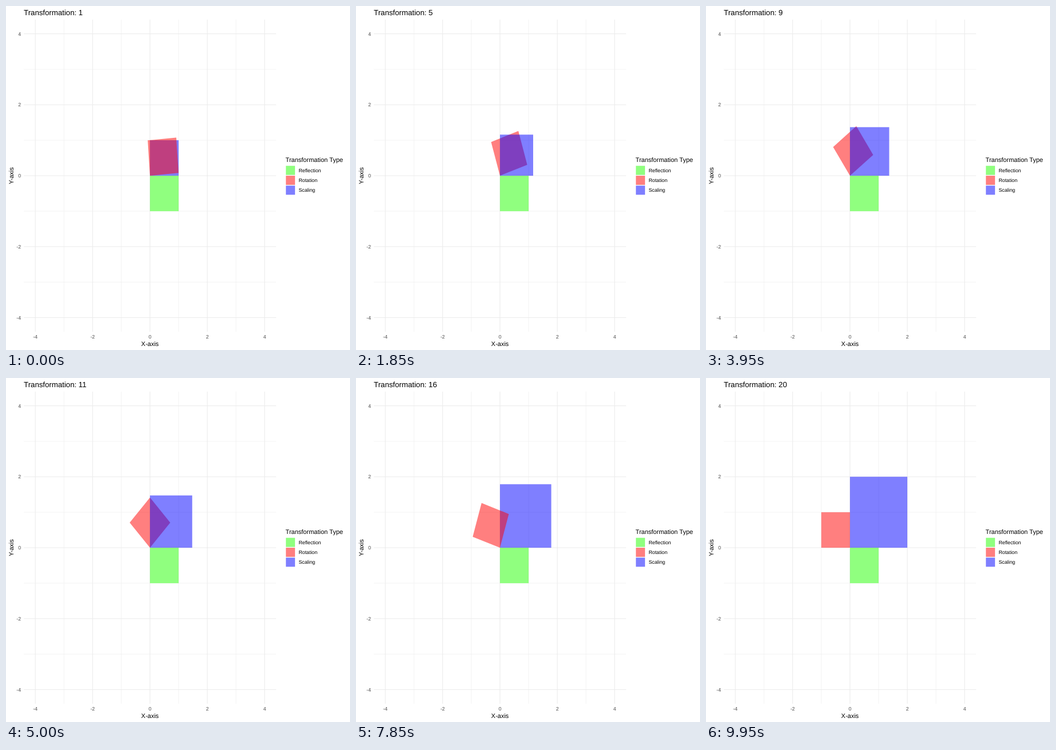
Animation, 600 px wide and 600 px high, one loop 10 s. Source, as an HTML page:

```html
<!DOCTYPE html>
<html lang="en">
<head>
<meta charset="utf-8">
<title>Transformations</title>
<style>
  html, body { margin: 0; width: 100%; height: 100%; overflow: hidden; background: #fff; }
  svg { display: block; width: 600px; height: 600px; }
  text { font-family: "Liberation Sans", Arial, sans-serif; font-size: 11px; text-rendering: geometricPrecision; }
  .title { font-size: 13.2px; }
  .tick { font-size: 8.8px; fill: #4d4d4d; }
  .key { font-size: 8.8px; }
  .mid { text-anchor: middle; }
  .end { text-anchor: end; }
  .grid { stroke: #ebebeb; }
  .reflection { fill: rgb(34 255 0 / .5); }
  .rotation { fill: rgb(255 0 0 / .5); }
  .scaling { fill: rgb(0 0 255 / .5); }
</style>
</head>
<body>
<svg viewBox="0 0 600 600">
  <g id="axes"></g>
  <g id="shapes" transform="translate(251.1 296) scale(50 -61.87)">
    <rect class="reflection" y="-1" width="1" height="1"/>
    <rect class="scaling" id="scaling" width="1" height="1"/>
    <rect class="rotation" id="rotation" width="1" height="1"/>
  </g>
  <text class="title" id="title" x="31.1" y="16.1"></text>
  <text class="mid" x="251.1" y="593">X-axis</text>
  <text class="mid" transform="translate(13 296) rotate(-90)">Y-axis</text>
  <text x="487.6" y="272">Transformation Type</text>
  <g id="legend"></g>
</svg>
<script>
const STATES = 20, LOOP = 10000, TICK = 50, TITLE_LEAD = 250;
const X0 = 251.1, Y0 = 296, UX = 50, UY = 61.87, LIMIT = 4.4;
const $ = id => document.getElementById(id);

function add(parent, tag, attrs, text = '') {
  const el = document.createElementNS('http://www.w3.org/2000/svg', tag);
  for (const name in attrs) el.setAttribute(name, attrs[name]);
  el.textContent = text;
  parent.append(el);
}

function gridLines(value, width) {
  const x = X0 + value * UX, y = Y0 - value * UY;
  const line = { class: 'grid', 'stroke-width': width };
  add($('axes'), 'line', { ...line, x1: X0 - LIMIT * UX, x2: X0 + LIMIT * UX, y1: y, y2: y });
  add($('axes'), 'line', { ...line, x1: x, x2: x, y1: Y0 - LIMIT * UY, y2: Y0 + LIMIT * UY });
}

for (let v = -3; v <= 3; v += 2) gridLines(v, 0.53);
for (let v = -4; v <= 4; v += 2) {
  gridLines(v, 1.07);
  add($('axes'), 'text', { class: 'tick mid', x: X0 + v * UX, y: 580 }, v);
  add($('axes'), 'text', { class: 'tick end', x: 26.2, y: Y0 - v * UY + 3.1 }, v);
}

['Reflection', 'Rotation', 'Scaling'].forEach((name, i) => {
  const y = 286.7 + i * 17.28;
  add($('legend'), 'rect', { class: name.toLowerCase(), x: 488.2, y: y - 7.95, width: 15.9, height: 15.9 });
  add($('legend'), 'text', { class: 'key', x: 510.4, y: y + 3.2 }, name);
});

// States are 10.5 ticks apart, snapped down to whole ticks.
const startOf = state => Math.floor((state - 1) * 10.5) * TICK;

let shown = '';
function draw(now) {
  const t = now % LOOP;
  let state = 1;
  while (state < STATES && t >= startOf(state + 1)) state++;
  const label = state < STATES && t >= startOf(state + 1) - TITLE_LEAD ? state + 1 : state;
  // Rotation is on top for one tick; while waiting for the next state, scaling is.
  const top = t < startOf(state) + TICK ? 'rotation' : 'scaling';
  const key = [state, label, top].join();
  if (key !== shown) {
    shown = key;
    $('title').textContent = 'Transformation: ' + label;
    $('scaling').setAttribute('transform', `scale(${1 + (state - 1) / (STATES - 1)})`);
    $('rotation').setAttribute('transform', `rotate(${90 * state / STATES})`);
    $('shapes').append($(top));
  }
}

const origin = performance.now();
function loop() {
  draw(performance.now() - origin);
  requestAnimationFrame(loop);
}
loop();
</script>
</body>
</html>
```
